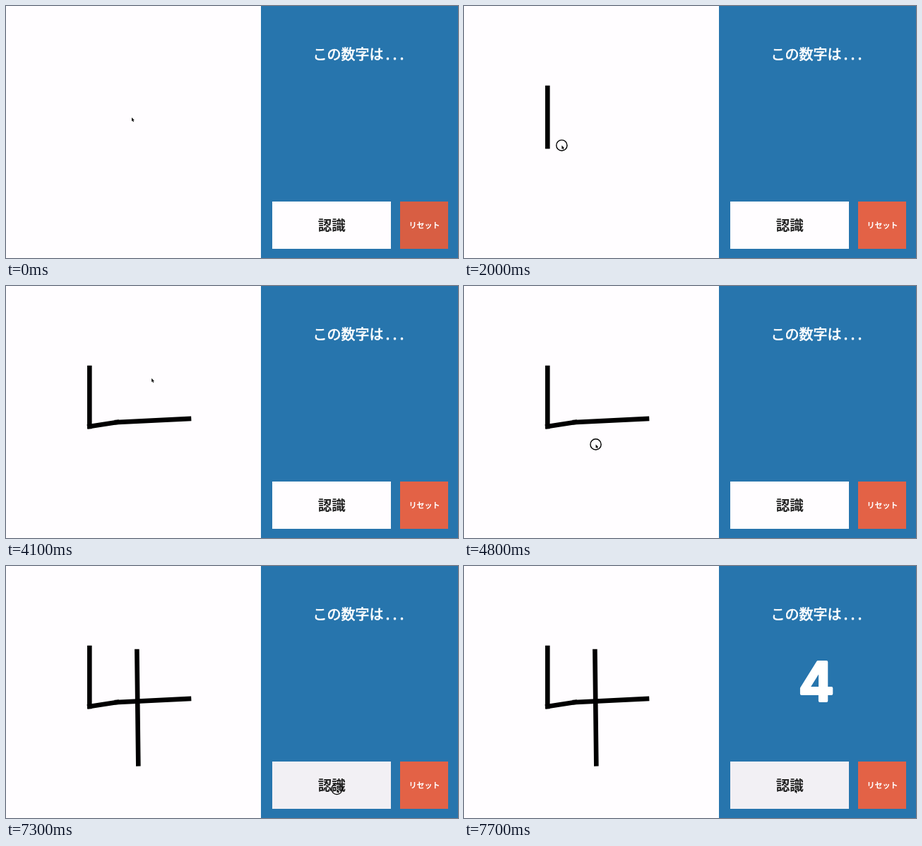
An HTML page with a canvas for the animation above (8000 ms loop, 640 px wide and 357 px high).

```html
<!DOCTYPE html>
<html lang="ja">
<head>
<meta charset="utf-8">
<style>
  html, body { margin: 0; width: 100%; height: 100%; overflow: hidden; background: #fffdff; }
  canvas { display: block; }
</style>
</head>
<body>
<canvas id="stage" width="640" height="357"></canvas>
<script>
const ctx = document.getElementById('stage').getContext('2d');
const LOOP = 8000, STEP = 100;
const JP = '"Noto Sans CJK JP", "Noto Sans CJK", sans-serif';

const point = (x, y) => ({ x, y });
const home = point(178, 158);
const leftTop = point(118.3, 116), corner = point(118.3, 199);
const elbow = point(157, 193), rightTip = point(259, 188);
const hover = point(185, 108), stemTop = point(185.4, 121), stemFoot = point(187.3, 280.3);
const button = point(468.5, 316);

const linear = k => k;
const easeOut = k => 1 - (1 - k) ** 2.7;

const segment = (start, end, from, to, ease = linear) => ({ start, end, from, to, ease });

const moves = [
  segment(0, 400, home, leftTop, easeOut),
  segment(600, 1550, leftTop, corner),
  segment(1900, 2600, corner, rightTip),
  segment(3600, 4300, rightTip, hover),
  segment(4500, 5380, hover, stemFoot, easeOut),
  segment(6500, 6800, stemFoot, button)
];

// The ink trails behind the pointer
const strokes = [
  segment(930, 1700, leftTop, corner),
  segment(2100, 2600, corner, elbow),
  segment(3000, 3100, elbow, rightTip),
  segment(5580, 6100, stemTop, stemFoot, easeOut)
];

const presses = [[600, 3500], [4500, 6400], [7100, 7500]];

function positionOn({ start, end, from, to, ease }, t) {
  const k = ease(Math.min(1, Math.max(0, (t - start) / (end - start))));
  return point(from.x + (to.x - from.x) * k, from.y + (to.y - from.y) * k);
}

function rect(color, x, y, w, h) {
  ctx.fillStyle = color;
  ctx.fillRect(x, y, w, h);
}

// A thin rounded outline thickens the letters
function text(str, x, y, font, color, outline = 0) {
  ctx.font = font;
  ctx.fillStyle = ctx.strokeStyle = color;
  ctx.fillText(str, x, y);
  if (!outline) return;
  ctx.lineWidth = outline;
  ctx.lineJoin = 'round';
  ctx.strokeText(str, x, y);
}

function drawPanel(t) {
  rect('#2775ad', 361, 0, 279, 357);
  ctx.textAlign = 'center';
  const titleFont = '500 20px ' + JP;
  text('この数字は', 484.5, 76, titleFont, '#fff', 0.7);
  for (let i = 0; i < 3; i++) text('.', 540.5 + i * 10, 76, titleFont, '#fff', 1);

  rect(t < 6800 ? '#fffdff' : '#f2f0f4', 377, 277, 168, 67);
  text('認識', 461.2, 318, 'bold 19.5px ' + JP, '#222');
  rect(t < 600 ? '#d85e43' : '#e36246', 558, 277, 68, 67);
  text('リセット', 592.5, 314.5, 'bold 11px ' + JP, '#fff');

  if (t >= 7600) text('4', 499, 191, '600 75px Inter, sans-serif', '#fff', 4);
}

function drawInk(stroke, t) {
  if (t < stroke.start) return;
  const tip = positionOn(stroke, t);
  ctx.beginPath();
  ctx.moveTo(stroke.from.x, stroke.from.y);
  ctx.lineTo(tip.x, tip.y);
  ctx.strokeStyle = '#000';
  ctx.lineWidth = 6.6;
  ctx.lineCap = 'square';
  ctx.stroke();
}

function drawPointer(t) {
  const move = moves.findLast(m => m.start <= t);
  const { x, y } = positionOn(move, t);
  ctx.save();
  ctx.translate(x, y);
  if (presses.some(([from, to]) => t >= from && t < to)) {
    ctx.beginPath();
    ctx.arc(0, 0, 7.6, 0, Math.PI * 2);
    ctx.strokeStyle = '#000';
    ctx.lineWidth = 1.4;
    ctx.stroke();
  }
  const arrow = new Path2D('M0 0V5.2L1.2 4.2L2.1 6.2L3 5.8L2.2 3.8H3.8Z');
  ctx.lineJoin = 'round';
  ctx.strokeStyle = '#fff';
  ctx.lineWidth = 1;
  ctx.stroke(arrow);
  ctx.fillStyle = '#000';
  ctx.fill(arrow);
  ctx.restore();
}

function draw(now) {
  const t = Math.floor((now % LOOP) / STEP) * STEP;
  rect('#fffdff', 0, 0, 640, 357);
  drawPanel(t);
  strokes.forEach(stroke => drawInk(stroke, t));
  drawPointer(t);
}

let start;
function frame(now) {
  start ??= now;
  draw(Math.max(0, now - start));
  requestAnimationFrame(frame);
}
draw(0);
requestAnimationFrame(frame);
</script>
</body>
</html>
```
